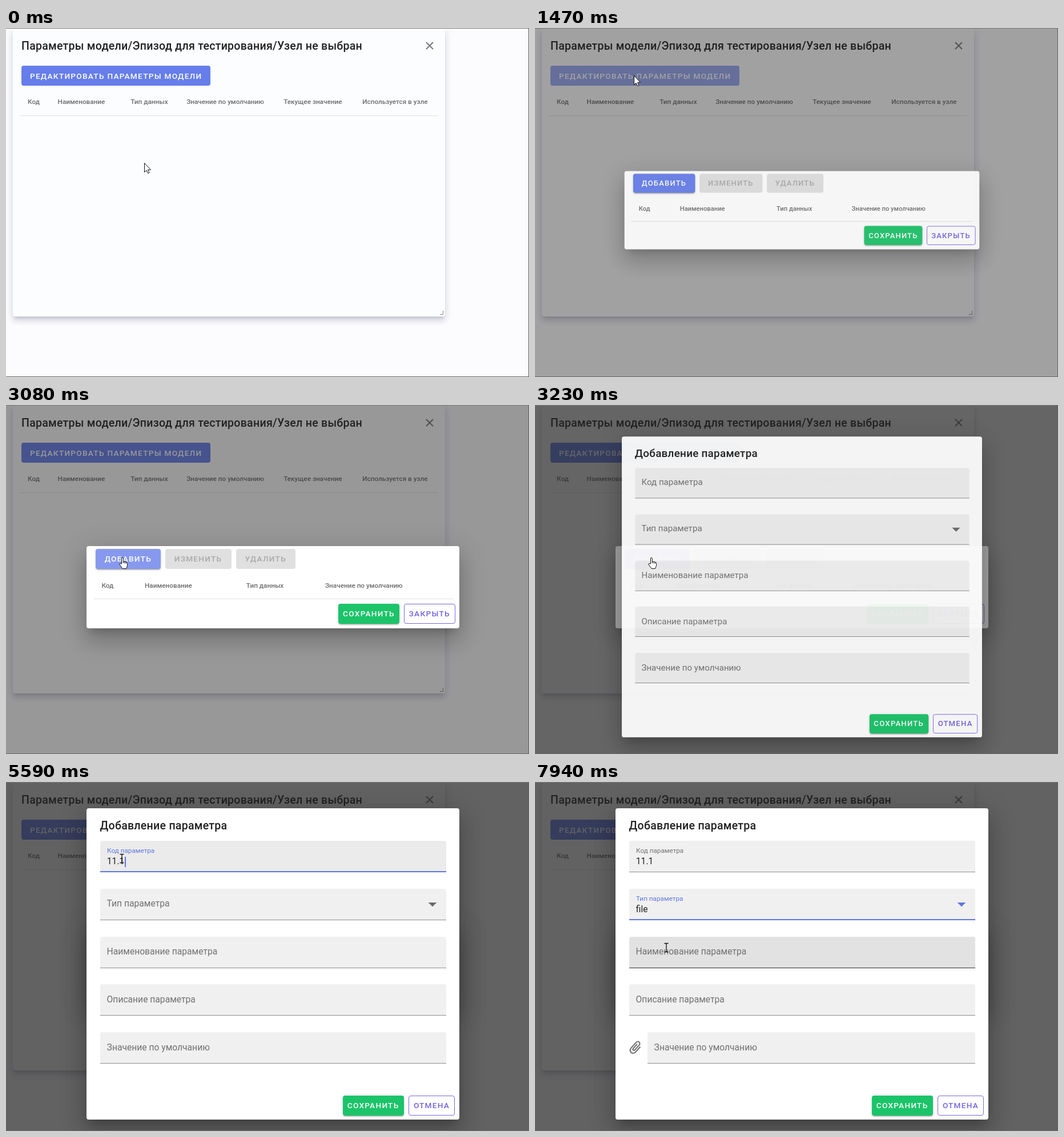
Animation, 916 px wide and 611 px high, one loop 8 s. Source, as an HTML page:

```html
<!DOCTYPE html>
<html lang="ru">
<head>
<meta charset="utf-8">
<title>Параметры модели</title>
<style>
* { box-sizing: border-box; }
html, body { margin: 0; width: 100%; height: 100%; overflow: hidden; background: #fcfcff; }
body { position: relative; font: 400 15.65px Roboto, sans-serif; color: #212121; }
div, svg { position: absolute; }
svg { overflow: visible; }
.layer { left: 0; top: 0; width: 916px; height: 611px; }
.text { line-height: 20px; white-space: pre; }
.title { font-weight: 500; font-size: 19.56px; letter-spacing: .0125em; }
.head { font-weight: 500; font-size: 11.74px; color: #6c6c6e; }
.hint { color: #707070; transform-origin: 0 50%; }
.btn { display: flex; align-items: center; justify-content: center; border-radius: 4px;
  font-weight: 500; font-size: 13.69px; letter-spacing: .0892857em; white-space: nowrap; color: #fff; overflow: hidden; }
.blue { background: #667eea; }
.green { background: #1bc469; }
.off { background: #e0e0e0; color: #a8a8a8; }
.line { border: 1px solid #7868e6; color: #7262e3; }
.raised, .line, .off { padding-bottom: 1px; }
.raised { box-shadow: 0 3px 1px -2px rgba(0,0,0,.2), 0 2px 2px rgba(0,0,0,.14), 0 1px 5px rgba(0,0,0,.12); }
.panel { background: #fcfdff; border-radius: 4px;
  box-shadow: 0 5px 5px -3px rgba(40,40,80,.16), 0 8px 10px 1px rgba(40,40,80,.1), 0 3px 14px 2px rgba(40,40,80,.08); }
.card { background: #fff; border-radius: 4px;
  box-shadow: 0 11px 15px -7px rgba(0,0,0,.2), 0 24px 38px 3px rgba(0,0,0,.14), 0 9px 46px 8px rgba(0,0,0,.12); }
.menu { background: #fff; border-radius: 4px;
  box-shadow: 0 5px 5px -3px rgba(0,0,0,.2), 0 8px 10px 1px rgba(0,0,0,.14), 0 3px 14px 2px rgba(0,0,0,.12); }
.field { background: #f0f0f0; border-radius: 4px 4px 0 0; }
.rule { background: #e2e2e4; }
</style>
</head>
<body>
<script>
const BLUE = '#5f76e0';

function box(parent, cls, x, y, w, h, text) {
  const d = document.createElement('div');
  d.className = cls;
  Object.assign(d.style, { left: x + 'px', top: y + 'px' });
  if (w) d.style.width = w + 'px';
  if (h) d.style.height = h + 'px';
  if (text) d.textContent = text;
  parent.append(d);
  return d;
}
// y is the middle of the text line
const text = (parent, cls, x, y, s) => box(parent, 'text ' + cls, x, y - 10, 0, 0, s);
const layer = parent => box(parent, 'layer', 0, 0);
function draw(parent, x, y, markup) {
  parent.insertAdjacentHTML('beforeend',
    `<svg width="1" height="1" style="left:${x}px;top:${y}px">${markup}</svg>`);
  return parent.lastElementChild;
}
function scrim() {
  const d = box(document.body, '', 0, 1, 915, 609);
  d.style.background = '#212121';
  return d;
}
function heads(parent, y, list) {
  for (const [x, s] of list) text(parent, 'head', x, y, s);
}

// Main panel
const main = layer(document.body);
box(main, 'panel', 11.5, 1, 757.5, 504);
text(main, 'title', 27, 31.9, 'Параметры модели/Эпизод для тестирования/Узел не выбран');
draw(main, 741.5, 31.3, '<path d="M-6-6 6 6M6-6-6 6" stroke="#747476" stroke-width="1.9"/>');
const edit = box(main, 'btn blue', 27, 66.3, 331.4, 35, 'РЕДАКТИРОВАТЬ ПАРАМЕТРЫ МОДЕЛИ');
const glow = box(edit, '', 0, 0, 332, 35);
glow.style.background = '#fff';
heads(main, 129.3, [[38, 'Код'], [90.6, 'Наименование'], [218.2, 'Тип данных'],
  [316.2, 'Значение по умолчанию'], [486.2, 'Текущее значение'], [624.2, 'Используется в узле']]);
box(main, 'rule', 24, 153, 733, 1);
draw(main, 759, 494, '<path d="M1 7.5H6.5V1" fill="none" stroke="#858588"/>');

// Parameter list dialog
const shade1 = scrim();
const list = layer(document.body);
list.style.transformOrigin = '467.5px 318.6px';
box(list, 'card', 141.3, 246.7, 652.7, 144);
const add = box(list, 'btn blue raised', 157, 252.2, 113.7, 35, 'ДОБАВИТЬ');
box(list, 'btn off', 278.6, 252.2, 116, 35, 'ИЗМЕНИТЬ');
box(list, 'btn off', 402.5, 252.2, 104.5, 35, 'УДАЛИТЬ');
heads(list, 315.5, [[167.4, 'Код'], [243, 'Наименование'], [420.8, 'Тип данных'], [559, 'Значение по умолчанию']]);
box(list, 'rule', 153, 338.6, 630, 1);
box(list, 'btn green raised', 582, 347.8, 107, 35, 'СОХРАНИТЬ');
box(list, 'btn line', 697, 347.8, 89.5, 35, 'ЗАКРЫТЬ');

// New parameter dialog
const shade2 = scrim();
const form = layer(document.body);
form.style.transformOrigin = '467.5px 318.6px';
box(form, 'card', 141.3, 45.8, 652.7, 545.6);
text(form, 'title', 164.6, 77, 'Добавление параметра');
const fields = ['Код параметра', 'Тип параметра', 'Наименование параметра',
  'Описание параметра', 'Значение по умолчанию'].map((s, i) => {
  const y = 102.9 + i * 83.8;
  const base = box(form, 'field', 165, y, 606, 55);
  const line = box(base, '', 0, 54, 0, 1);
  line.style.width = '100%';
  const bar = box(base, '', 0, 53, 606, 2);
  bar.style.background = BLUE;
  const hint = text(base, 'hint', 11.6, 26.6, s);
  const value = text(base, '', 11.8, 36.6, '');
  return { y, base, line, bar, hint, value };
});
const caret = box(fields[0].base, '', 12, 28, 1.6, 18);
caret.style.background = BLUE;
const arrow = draw(form, 747, 210.9, '<path d="M-7.3 0H7.3L0 7.3Z"/>');
const clip = draw(form, 176.3, 465, '<path transform="rotate(42) scale(1.12) translate(-12.5-12)" ' +
  'd="M17.2 6v11.5a4.7 4.7 0 0 1-9.4 0V5a3.2 3.2 0 0 1 6.4 0v10.5a1.7 1.7 0 0 1-3.4 0V6" ' +
  'fill="none" stroke="#6c6c6c" stroke-width="1.8"/>');
box(form, 'btn green raised', 589.7, 548.6, 107, 35, 'СОХРАНИТЬ');
box(form, 'btn line', 704.7, 548.6, 81.8, 35, 'ОТМЕНА');

// Type menu
const menu = box(document.body, 'menu', 165, 186, 606, 109.4);
menu.style.transformOrigin = '0 0';
const item = box(menu, '', 0, 7.8, 606, 47);
text(menu, '', 15.4, 31.7, 'file');
text(menu, '', 15.4, 78.6, 'not-file');

// Pointer shapes share the hotspot 0,0
const pointer = layer(document.body);
const shapes = {
  arrow: '<path d="M.5.5V16.5L4 13.2 6.6 18.5 9 17.4 6.5 12.2H11.5Z" fill="#fff" stroke="#111"/>',
  hand: '<path transform="translate(-6)" d="M4.5 11V1.8a1.4 1.4 0 0 1 2.8 0V7l5 1q2.2.5 2.2 2.5v4l-2 5H6.2L1 12.4q-.8-1.7 1-1.9z" fill="#fff" stroke="#111"/>' +
    '<path d="M1.3 7v3M4 8v2.4M6.4 8.6v2" stroke="#111"/>',
  beam: '<path d="M-3.5-7.5h2.5L0-6.5 1-7.5H3.5M-3.5 7.5H-1L0 6.5 1 7.5H3.5M0-6.5V6.5" fill="none" stroke="#111" stroke-width="1.3"/>'
};
for (const k in shapes) shapes[k] = draw(pointer, 0, 0, shapes[k]);

// Window edges
box(document.body, '', 0, 0, 916, 1).style.background = '#777';
box(document.body, '', 0, 610, 916, 1).style.background = '#666';
box(document.body, '', 915, 0, 1, 611).style.background = '#5c5c5c';

const LOOP = 8000;
// bursts of updates: first, last, count
const ticks = [0];
for (const [a, b, n] of [[280, 1010, 6], [1320, 1770, 4], [2070, 2650, 5], [3080, 4110, 8],
  [4240, 4850, 5], [5150, 5300, 2], [5590, 6620, 8], [7510, 7940, 4]])
  for (let i = 0; i < n; i++) ticks.push(Math.round((a + (b - a) * i / (n - 1)) / 10) * 10);

const clamp = v => Math.max(0, Math.min(1, v));
const ramp = (t, start, ms) => clamp((t - start) / ms);
const swift = (t, start) => 1 - (1 - ramp(t, start, 300)) ** 4;
const smooth = p => p * p * (3 - 2 * p);

function at(keys, t) {
  let i = 0;
  while (i < keys.length - 1 && keys[i + 1][0] <= t) i++;
  const a = keys[i], b = keys[i + 1];
  if (!b) return a.slice(1);
  const p = smooth(ramp(t, a[0], b[0] - a[0]));
  return a.slice(1).map((v, j) => v + (b[j + 1] - v) * p);
}

const path = [[0, 242, 236], [150, 242, 236], [1010, 173, 83], [1950, 173, 83], [2650, 204, 267],
  [3300, 204, 267], [4110, 198, 127], [5480, 198, 127], [6100, 257, 206], [7510, 257, 206], [7940, 230, 290]];
const flash = [[0, 0], [1200, 0], [1470, .32], [1770, 0]];
const typed = [[4690, '1'], [4850, '11'], [5150, '11.'], [5300, '11.1']];

function open(dialog, shade, p) {
  dialog.style.opacity = p;
  dialog.style.transform = `scale(${.5 + .5 * p})`;
  shade.style.opacity = .46 * p;
}

function setField(f, float, focus, hover, tone) {
  f.hint.style.transform = `translateY(${-8.9 * float}px) scale(${1 - .25 * float})`;
  f.hint.style.color = focus ? BLUE : '#707070';
  f.bar.style.transform = `scaleX(${focus})`;
  f.line.style.background = hover ? '#2c2c2c' : '#8e8e8e';
  f.base.style.background = hover ? tone : '#f0f0f0';
}

function render(now) {
  const raw = now % LOOP;
  const t = ticks.filter(v => v <= raw).pop();
  const [x, y] = at(path, t);

  // pointer and hover
  const p1 = swift(t, 1337), p2 = swift(t, 3083);
  const listed = t >= 6330 && t < 7650;
  const over = p2 === 1 && !listed ? fields.findIndex(f => y > f.y && y < f.y + 55) : -1;
  let kind = 'arrow';
  if (!p1) kind = y < 101 ? 'hand' : 'arrow';
  else if (!p2) kind = y > 252 ? 'hand' : 'arrow';
  else if (p2 < 1 || listed || over === 1) kind = 'hand';
  else if (over >= 0) kind = 'beam';
  if (t >= 4690 && t < 5590) kind = '';
  for (const k in shapes) shapes[k].style.display = k === kind ? 'block' : 'none';
  pointer.style.transform = `translate(${Math.round(x)}px, ${Math.round(y)}px)`;

  // buttons and dialogs
  glow.style.opacity = Math.max(at(flash, t)[0], !p1 && y < 101 ? .08 : 0);
  add.style.background = t >= 3080 ? '#8799ef' : p1 && y > 252 ? '#6e85eb' : '#667eea';
  open(list, shade1, p1);
  open(form, shade2, p2);

  // fields
  const float1 = swift(t, 4154), focus1 = t < 6180 ? float1 : 0;
  const focus2 = swift(t, 6130);
  setField(fields[0], float1, focus1, over === 0 || focus1 > 0, '#ebebeb');
  setField(fields[1], focus2, focus2, over === 1, '#e2e2e2');
  for (let i = 2; i < 5; i++) setField(fields[i], 0, 0, over === i, '#e2e2e2');
  const word = typed.filter(k => k[0] <= t).pop();
  fields[0].value.textContent = word ? word[1] : '';
  caret.style.display = focus1 ? 'block' : 'none';
  caret.style.left = 12 + fields[0].value.offsetWidth + 'px';

  const chosen = t >= 7650;
  fields[1].value.textContent = chosen ? 'file' : '';
  arrow.style.fill = focus2 ? BLUE : '#6a6a6a';
  clip.style.display = chosen ? 'block' : 'none';
  fields[4].base.style.left = (chosen ? 197 : 165) + 'px';
  fields[4].base.style.width = (chosen ? 574 : 606) + 'px';

  // menu
  const shown = ramp(t, 6250, 140);
  menu.style.opacity = shown * (1 - ramp(t, 7600, 75));
  menu.style.transform = `scale(${.8 + .2 * shown})`;
  item.style.background = t >= 7510 ? '#dedede' : t >= 6470 ? '#f0f0f0' : '#fff';
}

const began = performance.now();
function frame() {
  render(performance.now() - began);
  requestAnimationFrame(frame);
}
frame();
</script>
</body>
</html>
```
